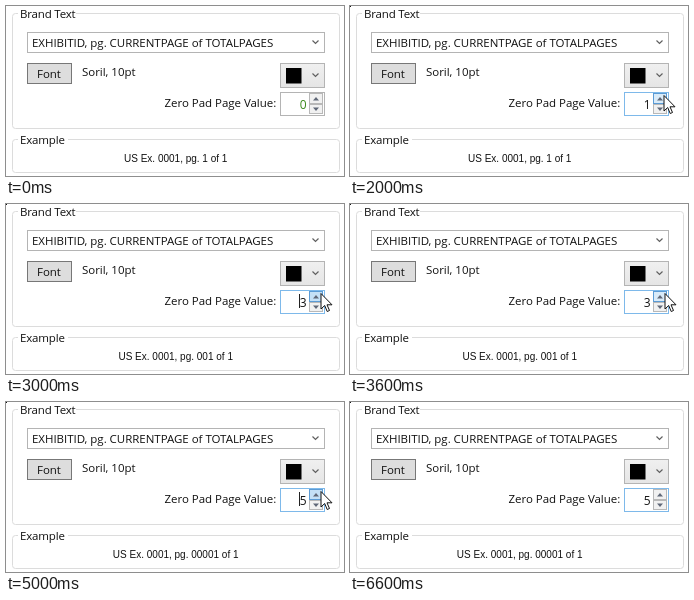
Recreate the animation shown at these times as an HTML page. Size 338 px wide and 170 px high, loop 6800 ms.

```html
<!DOCTYPE html>
<html lang="en">
<meta charset="utf-8">
<title>Brand text settings</title>
<style>
  html, body { margin: 0; width: 100%; height: 100%; overflow: hidden; background: #fff; }
  svg { display: block; }
  text { font: 11.5px "Open Sans", sans-serif; letter-spacing: -.03px; fill: #111; }
  .title { letter-spacing: -.18px; }
  #example { font: 10px "Liberation Sans", sans-serif; letter-spacing: 0; text-anchor: middle; }
  #value { font-size: 12px; text-anchor: end; }
  .group { fill: none; stroke: #dcdcdc; }
  .box { fill: #fff; stroke: #b4b4b4; }
  .chevron { fill: none; stroke: #606060; stroke-width: 1.2; }
  .spin { fill: #f1f1f1; stroke: #b8b8b8; }
  .arrow { fill: #606878; }
</style>
<svg width="338" height="170" viewBox="0 0 338 170">
  <defs>
    <linearGradient id="face" x2="0" y2="1">
      <stop stop-color="#f0f0f0"/><stop offset="1" stop-color="#e5e5e5"/>
    </linearGradient>
  </defs>
  <rect class="group" x="6.5" y="7.5" width="327" height="115" rx="3"/>
  <rect class="group" x="6.5" y="133.5" width="327" height="33" rx="3"/>
  <path fill="#fff" d="M12 5h58v5h-58zM12 131h50v5h-50z"/>
  <text class="title" x="14" y="12">Brand Text</text>
  <text class="title" x="14" y="138">Example</text>

  <rect class="box" x="21.5" y="26.5" width="297" height="20"/>
  <text x="26" y="40.500">EXHIBITID, pg. CURRENTPAGE of TOTALPAGES</text>
  <path class="chevron" d="M306.500 34.500l3 3 3-3"/>

  <rect x="21.5" y="57.5" width="44" height="20" fill="#ddd" stroke="#777"/>
  <text x="31" y="72">Font</text>
  <text x="76" y="69.500">Soril, 10pt</text>

  <rect x="274.5" y="57.5" width="44" height="24" fill="url(#face)" stroke="#b4b4b4"/>
  <rect x="280" y="62" width="15.500" height="15.500"/>
  <path class="chevron" d="M306.500 67.500l3 3 3-3"/>

  <text x="158.500" y="101">Zero Pad Page Value:</text>
  <rect class="box" id="field" x="274.5" y="86.5" width="44" height="23"/>
  <text id="value" x="300.500" y="102.500"></text>
  <path id="caret" d="M293.500 90v14" stroke="#222"/>
  <rect class="spin" id="up" x="303.5" y="87.5" width="13" height="10"/>
  <rect class="spin" x="303.5" y="98.5" width="13" height="9"/>
  <path class="arrow" d="M307 94.500l3-3.500 3 3.500zM307 101.500h6l-3 3.500z"/>

  <text id="example" x="169.700" y="155.500"></text>
  <path id="cursor" d="M.5.5v15.500l3.700-3.500 2.500 6 2.300-1-2.500-5.700h5z" fill="#fff" stroke="#111" stroke-linejoin="round"/>
  <rect id="dot" width="1" height="1" fill="#111"/>
</svg>
<script>
  const LOOP = 6800;
  const clicks = [1200, 2200, 3000, 4000, 5000];
  const caretSpans = [[1400, 1800], [2200, 2800], [3000, 3600], [4000, 4400], [5000, 5600], [6000, 6600]];
  const $ = id => document.getElementById(id);
  const within = (t, [from, to]) => t >= from && t < to;
  const show = (id, on) => $(id).style.display = on ? "" : "none";
  const write = (id, text) => { if ($(id).textContent !== text) $(id).textContent = text; };

  function draw(now) {
    const t = now % LOOP;
    const count = clicks.filter(c => t >= c).length;
    const pressed = clicks.some(c => within(t, [c, c + 200]));
    const hover = within(t, [400, 5400]);

    write("value", String(count));
    $("value").style.fill = count ? "#111" : "#3c8a1e";
    write("example", `US Ex. 0001, pg. ${"1".padStart(count, "0")} of 1`);

    $("field").style.stroke = t >= 1400 ? "#7eb9ea" : "";
    $("up").style.fill = pressed ? "#c4e0f6" : hover ? "#d9ebf9" : "";
    $("up").style.stroke = hover ? "#5b9bd5" : "";

    show("caret", caretSpans.some(span => within(t, span)));
    show("dot", t >= 600);
    show("cursor", within(t, [200, 5400]));
    const x = t < 400 ? 319.5 : t < 3000 ? 313.5 : 314.5;
    $("cursor").setAttribute("transform", `translate(${x} 89)`);
    requestAnimationFrame(() => draw(performance.now()));
  }
  draw(performance.now());
</script>
</html>
```
